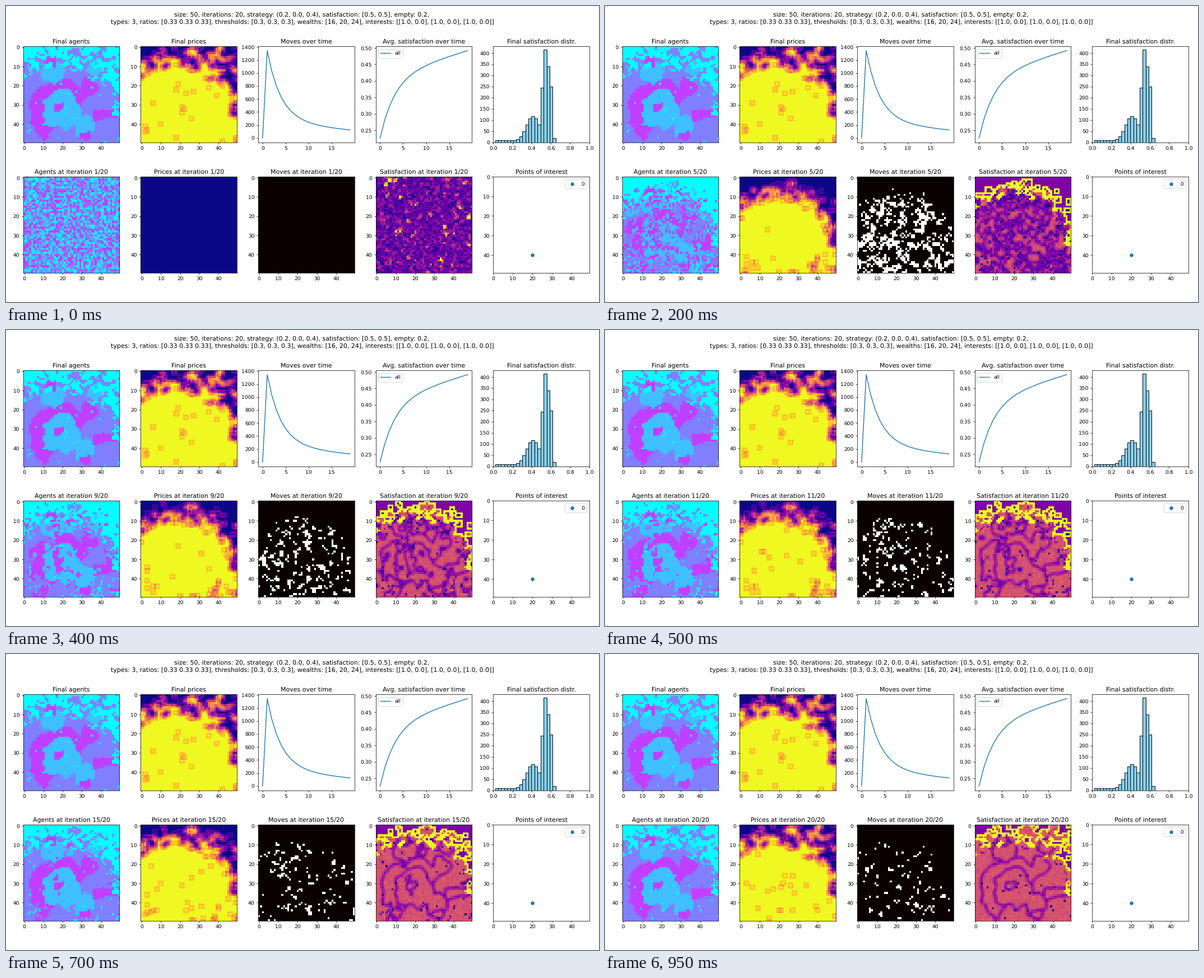
These frames come from a looping animation (1058 by 529 pixels, 1000 ms). A matplotlib script:

```python
import numpy as np
import matplotlib.pyplot as plt
from matplotlib.animation import FuncAnimation
from matplotlib.ticker import MultipleLocator

plt.rcParams["text.hinting"] = "none"

W, H = 1058, 529
N, STEPS = 50, 20
SIDE, LEFT, PITCH = 171.6, 30.8, 209.6
TOP, LOW = 72.0, 305.4
YY, XX = np.mgrid[0:N, 0:N].astype(float)


def distance(x, y):
    return np.hypot(XX - x, YY - y)


def neighbours(a):
    """Sum over the eight surrounding cells, nothing beyond the edge."""
    p = np.pad(a.astype(float), 1)
    total = sum(p[i:i + N, j:j + N] for i in range(3) for j in range(3))
    return total - a


AROUND = neighbours(np.ones((N, N)))


def blur(a, times=1):
    for _ in range(times):
        a = (neighbours(a) + a) / (AROUND + 1)
    return (a - a.mean()) / a.std()


def ranked(a):
    """Spread values evenly between 0 and 1."""
    return a.ravel().argsort().argsort().reshape(a.shape) / a.size


def progress(step):
    return min((step - 1) / (STEPS - 1), 1)


def settled_types(wobble):
    """Nested shells around the centre, with a few round quarters."""
    dx, dy = XX - 19, YY - 33
    r = np.hypot(dx, 0.9 * dy) + wobble
    kind = np.full((N, N), 2)
    kind[r < 10] = 1
    kind[(r >= 10) & (r < 16) & (dx + dy + wobble < 7)] = 3
    kind[(np.abs(YY - 35.5) + wobble < 2.3) & (XX > 35)] = 3
    quarters = [(1, 15, 13, 6.5), (1, 31, 41, 5), (1, 37, 11, 4),
                (2, 17, 45, 4.5), (3, 17, 31, 2.8), (3, 33, 21, 4.5),
                (3, 14, 8, 2.8), (3, 32, 47, 3)]
    for k, x, y, size in quarters:
        kind[distance(x, y) + wobble < size] = k
    return kind


rng = np.random.default_rng(12)
settled = settled_types(0.7 * blur(rng.normal(size=(N, N)), 3))
type_goal = np.array([settled == k for k in (1, 2, 3)], float)
type_noise = rng.normal(size=(3, N, N))
type_lumps = np.array([blur(n, 2) for n in type_noise])
gap_noise = rng.normal(size=(N, N))
gap_lumps = blur(gap_noise)
coast = blur(rng.normal(size=(N, N)), 4)
poi_dist = distance(20, 40)
rim_dist = distance(22, 28)


def agents_at(step):
    """0 is empty, 1 to 3 are the types; noise gives way to districts."""
    local = np.random.default_rng(100 + step)
    s = progress(step)
    lumpy = min((step - 1) / 9, 1)
    score = (1 - lumpy) * type_noise + lumpy * type_lumps
    score = score / score.std() + 4.2 * s * type_goal
    score += 0.4 * (1 - s) * local.normal(size=score.shape)
    agents = score.argmax(axis=0) + 1

    if step == 1:
        empty = ranked(gap_noise) < 0.2
    else:
        chance = np.clip((poi_dist + 2 * s * coast - 26) / 17, 0, 0.92)
        chance += 0.25 * (1 - s) * np.clip((rim_dist - 20) / 5, 0, 1)
        mix = 0.2 + 0.35 * s
        empty = ranked((1 - mix) * gap_noise + mix * gap_lumps) < chance
        empty |= local.random((N, N)) < 0.013 * s
    agents[empty] = 0
    return agents


def prices_at(step, agents):
    if step == 1:
        return np.zeros((N, N))
    return neighbours(agents > 0) / AROUND


def satisfaction_at(step, agents):
    local = np.random.default_rng(200 + step)
    full = neighbours(agents > 0)
    same = sum((agents == k) * neighbours(agents == k) for k in (1, 2, 3))
    sat = 0.06 + 0.48 * same / np.maximum(full, 1)
    sat += local.normal(0, 0.02, (N, N))
    vacant = np.clip((AROUND - full) / np.maximum(full, 1), 0, 1)
    vacant[full == 0] = 0.25
    return np.where(agents == 0, vacant, sat)


def move_count(t):
    return np.where(t < 1, 0, 1030 * np.exp((1 - t) / 2.9)
                    + 314 * np.exp((1 - t) / 19))


def moves_at(step, agents, sat):
    local = np.random.default_rng(300 + step)
    noise = local.normal(size=(N, N))
    score = 0.22 * (noise + 0.6 * blur(noise))
    score -= (0.3 + 0.8 * progress(step)) * sat
    score -= np.clip((poi_dist - 31) / 8, 0, 3)
    score[agents == 0] -= 0.4
    share = move_count(step - 1) / N**2
    return (ranked(score) >= 1 - share).astype(float)


def state(step):
    agents = agents_at(step)
    sat = satisfaction_at(step, agents)
    return (agents, prices_at(step, agents),
            moves_at(step, agents, sat), sat)


fig = plt.figure(figsize=(16, 8), dpi=W / 16, facecolor="white")
fig.suptitle(
    "size: 50, iterations: 20, strategy: (0.2, 0.0, 0.4), "
    "satisfaction: [0.5, 0.5], empty: 0.2, \n"
    "types: 3, ratios: [0.33 0.33 0.33], thresholds: [0.3, 0.3, 0.3], "
    "wealths: [16, 20, 24], interests: [[1.0, 0.0], [1.0, 0.0], [1.0, 0.0]]",
    linespacing=1.27)


def panel(col, top, title, xstep, ystep):
    ax = fig.add_axes([(LEFT + PITCH * col) / W, 1 - (top + SIDE) / H,
                       SIDE / W, SIDE / H])
    ax.set_title(title)
    ax.xaxis.set_major_locator(MultipleLocator(xstep))
    ax.yaxis.set_major_locator(MultipleLocator(ystep))
    return ax


def grid_panel(col, top, title, data, cmap, vmax):
    ax = panel(col, top, title, 10, 10)
    return ax, ax.imshow(data, cmap=cmap, vmin=0, vmax=vmax, aspect="auto")


# Upper row: results of the whole run
final = state(STEPS + 1)
grid_panel(0, TOP, "Final agents", final[0], "cool", 4)
grid_panel(1, TOP, "Final prices", final[1], "plasma", 1)

t = np.arange(STEPS)
ax = panel(2, TOP, "Moves over time", 5, 200)
ax.plot(t, move_count(t))

ax = panel(3, TOP, "Avg. satisfaction over time", 5, 0.05)
ax.plot(t, 0.2265 + 0.186 * (1 - np.exp(-t / 3.2)) + 0.0042 * t, label="all")
ax.yaxis.set_major_formatter("{x:.2f}")
ax.legend(loc="upper left")

ax = panel(4, TOP, "Final satisfaction distr.", 0.2, 50)
b = np.arange(20)
shoulder = 110 * np.exp(-((b - 12) / 3) ** 2)
peak = 390 * np.exp(-((b - 16.8) / 1.85) ** 6) * (1 - 0.17 * (b - 16))
edges = np.linspace(0.02, 0.65, len(b) + 1)
ax.bar(edges[:-1], 8 + shoulder + peak, np.diff(edges), align="edge",
       color="skyblue", edgecolor="black")
ax.set_xlim(0, 1)
ax.set_ylim(0, 430)

# Lower row: one state per iteration
LIVE = [("Agents", "cool", 4), ("Prices", "plasma", 1),
        ("Moves", "hot", 1), ("Satisfaction", "plasma", 1)]
states = [state(k) for k in range(1, STEPS + 1)]
live = [grid_panel(i, LOW, name, states[0][i], cmap, vmax)
        for i, (name, cmap, vmax) in enumerate(LIVE)]

ax = panel(4, LOW, "Points of interest", 10, 10)
ax.scatter([20], [40], label="0")
ax.set_xlim(0, N - 1)
ax.set_ylim(N - 1, 0)
ax.legend(loc="upper right")


def update(i):
    for (ax, im), data, (name, _, _) in zip(live, states[i], LIVE):
        im.set_data(data)
        ax.set_title(f"{name} at iteration {i + 1}/{STEPS}")
    return [im for _, im in live]


anim = FuncAnimation(fig, update, frames=STEPS, interval=50,
                     repeat=True, repeat_delay=0, blit=False)
plt.show()
```
